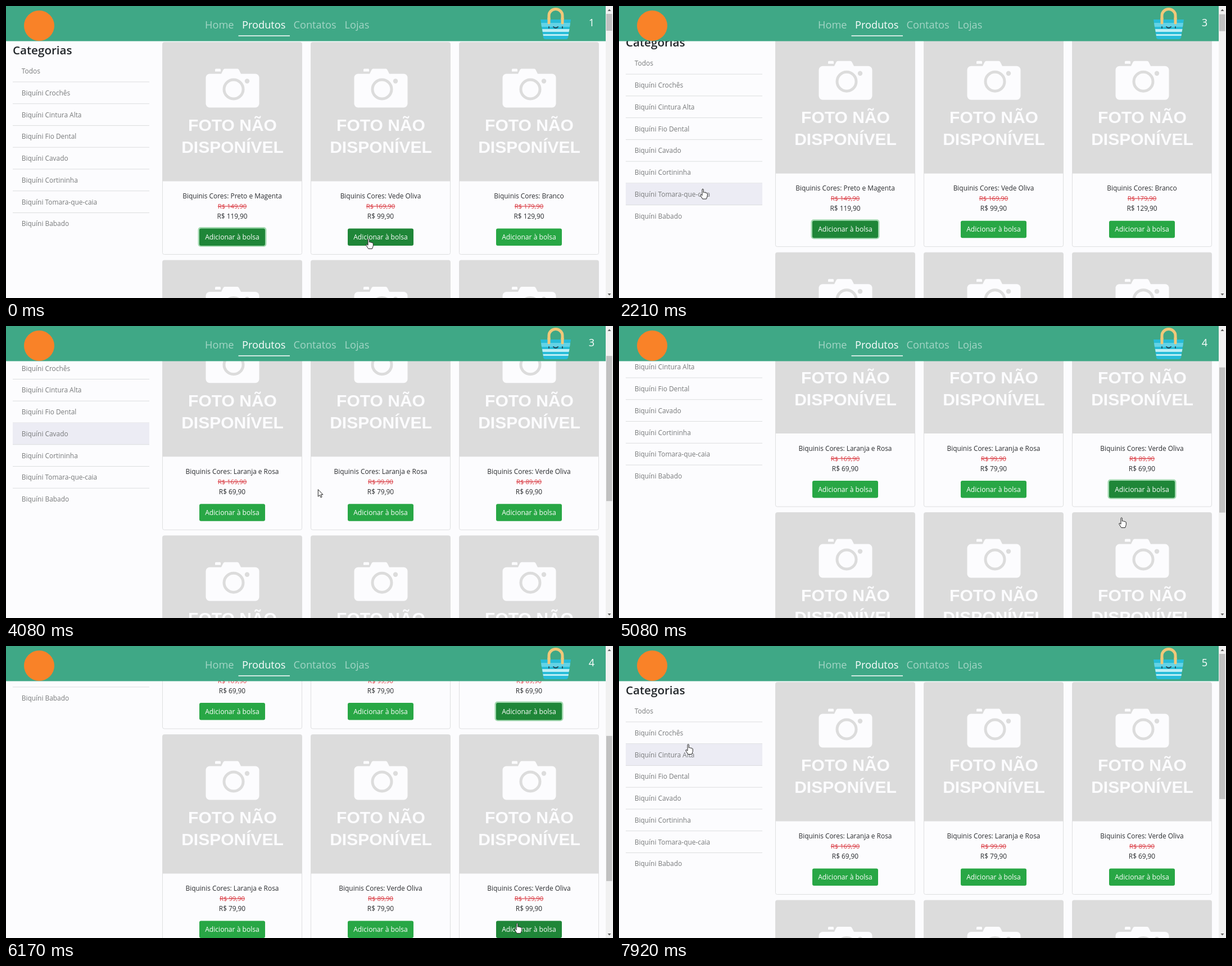
An HTML page for the animation above (8000 ms loop, 1080 px wide and 519 px high).

```html
<!DOCTYPE html>
<html lang="pt-BR">
<head>
<meta charset="utf-8">
<title>Produtos</title>
<style>
  html, body { margin: 0; width: 100%; height: 100%; overflow: hidden; background: #fcfcfe; }
  svg { display: block; width: 100%; height: 100%; }
  text { font: 11.9px "Open Sans", "Noto Sans", sans-serif; fill: #2b2d30; }
  .mid { text-anchor: middle; }
  .photo { font: bold 30px "Liberation Sans", Arial, sans-serif; fill: #fcfcfe; }
  .old { font-size: 11.3px; fill: #d9363e; text-decoration: line-through; }
  .label { font-size: 12.1px; fill: #fff; }
  .button { fill: #28a745; }
  .glow { fill: #a3d9b0; visibility: hidden; }
  .hover .button, .focus .button { fill: #1f8638; }
  .focus .glow { visibility: visible; }
  .row { fill: none; }
  .hover .row, .focus .row { fill: #ececf4; }
  .cat text { fill: #787a7b; }
  .cat path { stroke: #dcdedf; }
  h1, .heading { font-size: 20.6px; font-weight: 600; fill: #212529; }
  .nav { font-size: 18.2px; fill: #fff; }
  .dim { fill: #a4d6c6; }
</style>
</head>
<body>
<svg viewBox="0 0 1080 519" preserveAspectRatio="none">
  <rect width="1080" height="519" fill="#fcfcfe"/>
  <g id="page"></g>

  <rect width="1067" height="62.5" fill="#3fa886"/>
  <circle cx="59" cy="35" r="27" fill="#f98228"/>
  <text class="nav dim" x="354" y="40">Home</text>
  <text class="nav" x="420" y="40">Produtos</text>
  <text class="nav dim" x="511.5" y="40">Contatos</text>
  <text class="nav dim" x="602.5" y="40">Lojas</text>
  <path d="M413.500 53H505" stroke="#fff" stroke-width="1.6"/>
  <text class="nav mid" id="count" x="1042" y="36"></text>

  <g id="basket">
    <path d="M966 30V17a12 11.500 0 0 1 24 0V30" fill="none" stroke="#f2c879" stroke-width="5"/>
    <path d="M951 24H1005L1000 56Q999.500 59 996 59H960Q956.500 59 956 56Z" fill="#27bcd8"/>
    <path d="M952 30H1004L1003 37H953Z" fill="#64d3e6"/>
    <path d="M954 41H1002.500L1001.500 46H954.800ZM955.500 50H1001L1000.500 53H956Z" fill="#bdeef5"/>
    <path d="M966 37v2M990 37v2M974 37q4 4 8 0" fill="none" stroke="#24485a" stroke-width="1.8" stroke-linecap="round"/>
    <path d="M966 30V22M990 30V22" stroke="#f2c879" stroke-width="5" stroke-linecap="round"/>
  </g>

  <rect x="1067" width="13" height="519" fill="#f1f1f1"/>
  <path d="M1070.500 9L1073.500 5.500 1076.500 9ZM1070.500 511L1073.500 514.500 1076.500 511Z" fill="#606060"/>
  <rect id="thumb" x="1068" width="10.500" fill="#c1c1c1"/>

  <g id="cursor" stroke="#222" stroke-width="1" stroke-linejoin="round" fill="#fff">
    <path id="arrow" d="M.5 .5V13L3.400 10.300 5.300 14.700 7.300 13.800 5.400 9.600H9.200Z"/>
    <path id="hand" d="M-1 1.500Q0-.5 1.300 1.500V7Q2.600 5.800 3.700 7.300 5 6.300 6 7.900 7.500 7.200 8.300 9V13.500L6.500 18.500H-.2L-4 12.500Q-4.800 10.500-3 10.500L-1 12.300Z"/>
  </g>
</svg>
<script>
const $ = id => document.getElementById(id);
const LOOP = 8000;
const COL = 264, ROW = 387.5, CAT = 38.75;

const categories = ["Todos", "Biquíni Crochês", "Biquíni Cintura Alta", "Biquíni Fio Dental",
  "Biquíni Cavado", "Biquíni Cortininha", "Biquíni Tomara-que-caia", "Biquíni Babado"];
// name, old price, new price
const allItems = [["Preto e Magenta", 149, 119], ["Vede Oliva", 169, 99], ["Branco", 179, 129]];
const cavado = [["Laranja e Rosa", 169, 69], ["Laranja e Rosa", 99, 79], ["Verde Oliva", 89, 69],
  ["Laranja e Rosa", 99, 79], ["Verde Oliva", 89, 79], ["Verde Oliva", 129, 99]];

// time, x, y of the pointer tip
const pointer = [[0, 645, 413], [550, 645, 413], [1040, 475, 419], [1240, 420, 412], [1650, 420, 412],
  [2150, 150, 330], [2670, 141, 283], [3000, 120, 215], [3250, 85, 196], [3600, 85, 196],
  [3800, 240, 225], [4080, 554, 290], [4500, 894, 340], [5600, 894, 340], [6200, 910, 500],
  [6700, 910, 500], [7170, 240, 330], [7290, 225, 296], [7600, 150, 200], [7800, 123, 174]];
const scrolling = [[2150, 0], [2500, 79.2], [4950, 79.2], [5400, 220.8], [5650, 220.8],
  [5950, 294.5], [7400, 294.5], [7700, 0]];
// time, focused element, bag count
const clicks = [[0, "b0", 1], [470, "b1", 2], [1500, "b0", 3], [3450, "c4", 3], [4800, "b2", 4], [6600, "b5", 5]];
const FILTERED = 3450;

const category = (name, i) => `
  <g class="cat" id="c${i}" transform="translate(12 ${96.5 + i * CAT})">
    <rect class="row" width="243" height="${CAT}"/>
    ${i < 7 ? `<path d="M0 ${CAT - .3}H243"/>` : ""}
    <text x="15.800" y="23.700">${name}</text>
  </g>`;

const card = i => `
  <g id="b${i}" transform="translate(${278.5 + i % 3 * COL} ${64.5 + (i / 3 | 0) * ROW})">
    <rect width="248" height="377" rx="3" fill="#fcfcfe" stroke="#dedfe0"/>
    <path d="M0 247V3Q0 0 3 0H245Q248 0 248 3V247Z" fill="#dcdcdc"/>
    <g fill="#fcfcfe">
      <path d="M93.500 52V48.500Q93.500 47 95 47H102Q103.500 47 103.500 48.500V52M104 57L108 49Q109 47 111 47H133Q135 47 136 49L140 57Z"/>
      <rect x="77" y="56" width="95" height="60" rx="7"/>
    </g>
    <g fill="none" stroke="#dcdcdc"><circle cx="126.500" cy="83.500" r="17" stroke-width="5"/></g>
    <circle cx="150.500" cy="69" r="4.200" fill="#dcdcdc"/>
    <text class="photo mid" x="124.500" y="157.500">FOTO NÃO</text>
    <text class="photo mid" x="124.500" y="196.500">DISPONÍVEL</text>
    <text class="mid name" x="124" y="277.500"></text>
    <text class="mid old" x="124" y="295.500"></text>
    <text class="mid new" x="124" y="313.500"></text>
    <rect class="glow" x="63" y="328.500" width="122" height="35" rx="5"/>
    <rect class="button" x="65.500" y="331" width="117" height="30.500" rx="3"/>
    <text class="mid label" x="124" y="350.800">Adicionar à bolsa</text>
  </g>`;

$("page").innerHTML = `<text class="heading" x="12" y="86">Categorias</text>`
  + categories.map(category).join("") + [0, 1, 2, 3, 4, 5].map(card).join("");
const targets = [...document.querySelectorAll("#page > g")];

function at(keys, t) {
  let i = keys.findIndex(k => k[0] > t);
  if (i < 0) return keys[keys.length - 1].slice(1);
  if (!i) return keys[0].slice(1);
  const a = keys[i - 1], b = keys[i], p = (t - a[0]) / (b[0] - a[0]);
  return a.slice(1).map((v, k) => v + (b[k + 1] - v) * p);
}

function hit(x, y) {
  const c = Math.floor((y - 96.5) / CAT);
  if (x > 12 && x < 255) return c >= 0 && c < 8 ? "c" + c : "";
  const col = Math.floor((x - 278.5) / COL), row = Math.floor((y - 64.5) / ROW);
  const dx = x - 278.5 - col * COL, dy = y - 64.5 - row * ROW;
  const inside = col >= 0 && dx > 65.5 && dx < 182.5 && dy > 331 && dy < 361.5;
  return inside ? "b" + (row * 3 + col) : "";
}

let shown;
function fill(items) {
  if (shown === items) return;
  shown = items;
  for (let i = 0; i < 6; i++) {
    const [name, old, now] = items[i % items.length], box = $("b" + i);
    box.querySelector(".name").textContent = "Biquinis Cores: " + name;
    box.querySelector(".old").textContent = `R$ ${old},90`;
    box.querySelector(".new").textContent = `R$ ${now},90`;
  }
}

function draw(t) {
  const [x, y] = at(pointer, t), [scroll] = at(scrolling, t);
  const [, focus, count] = clicks.filter(c => c[0] <= t).pop();
  const filtered = t >= FILTERED;
  // hover is only refreshed once the pointer moves again
  const seen = t > 4500 && t < 5600 ? 79.2 : scroll;
  const hover = hit(x, y + seen);

  fill(filtered ? cavado : allItems);
  $("page").setAttribute("transform", `translate(0 ${-scroll})`);
  for (const el of targets) {
    el.classList.toggle("hover", el.id === hover);
    el.classList.toggle("focus", el.id === focus);
  }
  $("count").textContent = count;
  $("thumb").setAttribute("y", 14 + scroll * (filtered ? .495 : .05));
  $("thumb").setAttribute("height", filtered ? 258 : 30);
  $("cursor").setAttribute("transform", `translate(${x} ${y})`);
  $("hand").style.display = hover ? "" : "none";
  $("arrow").style.display = hover ? "none" : "";
}

const start = performance.now();
function tick() {
  draw((performance.now() - start) % LOOP);
  requestAnimationFrame(tick);
}
tick();
</script>
</body>
</html>
```
